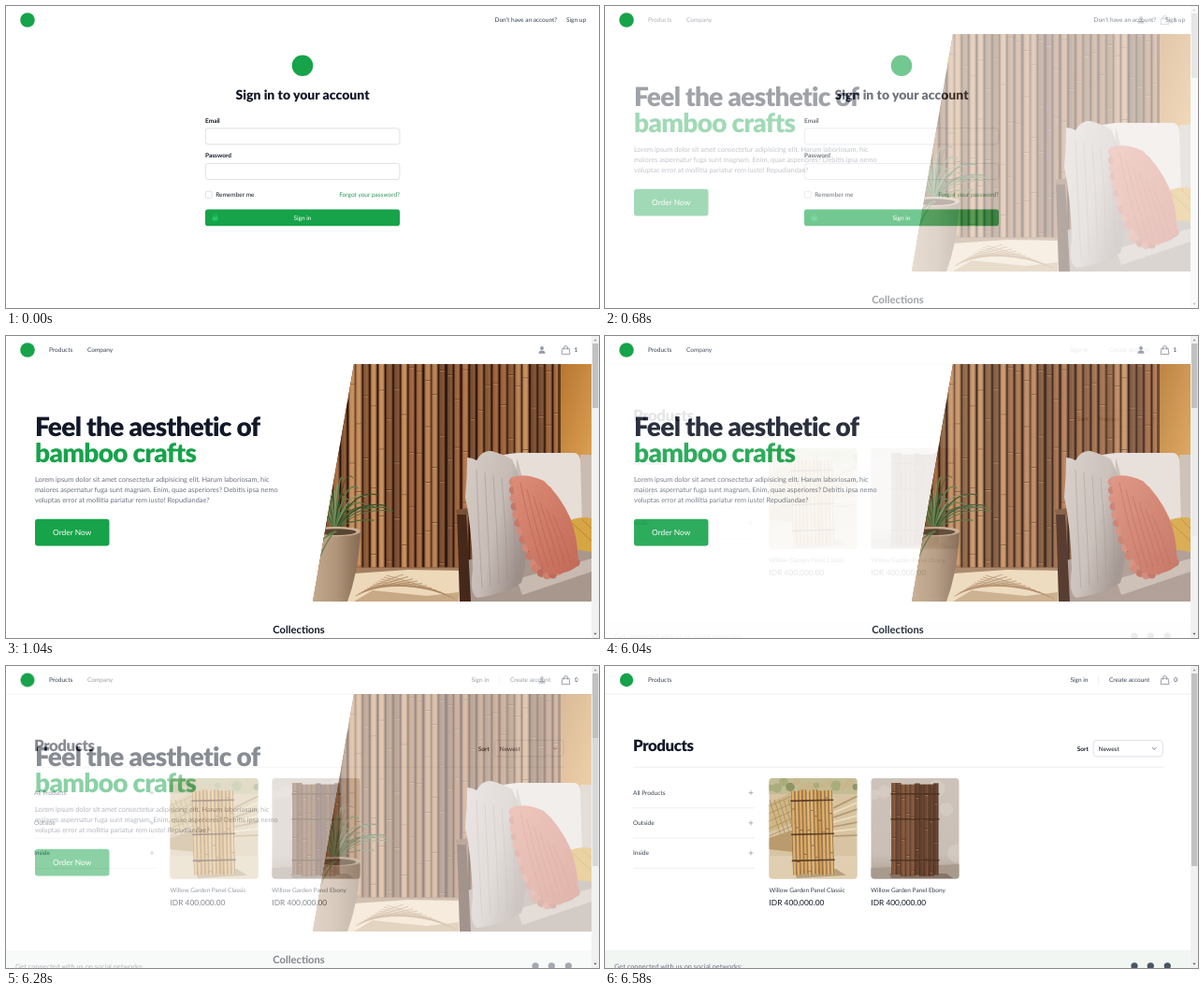
These frames come from a looping animation (634 by 323 pixels, 8000 ms). An HTML page:

```html
<!DOCTYPE html>
<html lang="en">
<head>
<meta charset="utf-8">
<title>Shop walkthrough</title>
<style>
html, body { margin: 0; width: 100%; height: 100%; overflow: hidden; background: #fff; }
svg { display: block; width: 100vw; height: 100vh; font-family: Lato, sans-serif; text-rendering: geometricPrecision; }
</style>
</head>
<body>
<svg id="stage" viewBox="0 0 634 323">
  <defs>
    <linearGradient id="pole">
      <stop offset="0" stop-color="#2a1006" stop-opacity=".55"/>
      <stop offset=".35" stop-color="#ffd9a8" stop-opacity=".14"/>
      <stop offset=".6" stop-color="#ffd9a8" stop-opacity=".22"/>
      <stop offset="1" stop-color="#2a1006" stop-opacity=".6"/>
    </linearGradient>
    <linearGradient id="linen" x2="1" y2=".6">
      <stop offset="0" stop-color="#d6ccc6"/><stop offset=".6" stop-color="#c6bbb5"/><stop offset="1" stop-color="#9c8e88"/>
    </linearGradient>
    <linearGradient id="clay">
      <stop offset="0" stop-color="#c3a98c"/><stop offset=".5" stop-color="#b0957a"/><stop offset="1" stop-color="#856a54"/>
    </linearGradient>
    <linearGradient id="rose" x2="1" y2="1">
      <stop offset="0" stop-color="#dc8d78"/><stop offset="1" stop-color="#c26a58"/>
    </linearGradient>
    <linearGradient id="plaster" x2="0" y2="1">
      <stop offset="0" stop-color="#cdc3ba"/><stop offset=".75" stop-color="#c9bfb6"/><stop offset="1" stop-color="#ad9f92"/>
    </linearGradient>
    <linearGradient id="wall" x2="1" y2="1">
      <stop offset="0" stop-color="#b5762f"/><stop offset="1" stop-color="#dda254"/>
    </linearGradient>
    <clipPath id="heroClip"><path d="M372 30H626V284H328Z"/></clipPath>
    <clipPath id="cardA"><rect x="175.5" y="120" width="94" height="107.5" rx="3.5"/></clipPath>
    <clipPath id="cardB"><rect x="284.5" y="120" width="94" height="107.5" rx="3.5"/></clipPath>
  </defs>
  <g id="login"></g>
  <g id="home" opacity="0"></g>
  <g id="list" opacity="0"></g>
</svg>
<script>
const GREEN = '#16a34a', INK = '#111827', BODY = '#374151', MUTED = '#6b7280', LINE = '#d1d5db', RULE = '#e5e7eb';
const SMALL = 6.53, BASE = 7.37;

let seed = 7;
const rand = () => (seed = (seed * 16807) % 2147483647) / 2147483647;
const pick = list => list[Math.floor(rand() * list.length)];
const times = (n, f) => Array.from({ length: n }, (_, i) => f(i)).join('');

const rect = (x, y, w, h, fill, more = '') => `<rect x="${x}" y="${y}" width="${w}" height="${h}" fill="${fill}" ${more}/>`;
const dot = (x, y, r, fill) => `<circle cx="${x}" cy="${y}" r="${r}" fill="${fill}"/>`;
const shape = (d, fill, more = '') => `<path d="${d}" fill="${fill}" ${more}/>`;
const stroke = (d, color, width = .8, more = '') => `<path d="${d}" fill="none" stroke="${color}" stroke-width="${width}" ${more}/>`;
const text = (x, y, str, size = SMALL, fill = BODY, weight = 400, more = '') =>
  `<text x="${x}" y="${y}" font-size="${size}" fill="${fill}" font-weight="${weight}" ${more}>${str}</text>`;
const title = (x, y, str, size, fill = INK) => text(x, y, str, size, fill, 900, 'letter-spacing="-.025em"');
const MID = 'text-anchor="middle"';
const page = () => rect(0, 0, 634, 323, '#fff');

const box = (x, y, w, h, r = 2.8) => rect(x, y, w, h, '#fff', `rx="${r}" stroke="${LINE}" stroke-width=".7"`);
const bag = () => stroke('M594.9 13.2H602.1L602.9 19.4H594.1ZM596.6 14.6V12.4A1.9 1.9 0 0 1 600.4 12.4V14.6', '#848b97', .8, 'stroke-linejoin="round"');

function scrollbar(end) {
  return rect(626, 0, 8, 323, '#f1f1f1') + rect(627, 8, 6.3, end - 8, '#c1c1c1') +
    shape('M628.5 5.2L630 3.2L631.5 5.2Z', '#8a8a8a') + shape('M628.5 317.8L630 319.8L631.5 317.8Z', '#505050');
}

function loginPage() {
  return page() + dot(23, 15, 7.8, GREEN) +
    text(522.5, 17.3, 'Don’t have an account?') + text(599, 17.3, 'Sign up') +
    dot(317, 63.8, 11.3, GREEN) +
    text(317, 100, 'Sign in to your account', 14, INK, 900, MID) +
    text(213, 124.6, 'Email', SMALL, INK, 700) + box(213.3, 130.8, 207.6, 17.2) +
    text(213, 162.3, 'Password', SMALL, INK, 700) + box(213.3, 168.4, 207.6, 17.2) +
    box(213.3, 198.3, 7, 7, 1.6) + text(224.2, 204.2, 'Remember me', SMALL, INK) +
    text(421, 204.2, 'Forgot your password?', SMALL, '#2b9557', 400, 'text-anchor="end"') +
    rect(213, 217.5, 208, 17.7, GREEN, 'rx="2.8"') +
    rect(220.6, 225.2, 6, 4.6, '#22c55e', 'rx=".8"') + stroke('M221.9 225.5V224.3A1.7 1.7 0 0 1 225.3 224.3V225.5', '#22c55e', .9) +
    text(317, 228.7, 'Sign in', SMALL, '#fff', 400, MID);
}

// Vertical cane with shaded sides and darker joints
function cane(x, y, w, h, color, gap) {
  let out = rect(x, y, w, h, color) + rect(x, y, w, h, 'url(#pole)');
  for (let j = y + rand() * gap; j < y + h; j += gap * (.7 + rand() * .6))
    out += rect(x + .6, j, w - 1.2, .9, '#3a1c0e', 'opacity=".55"') + rect(x + 1, j + .9, w - 2, .8, '#e6b983', 'opacity=".5"');
  return out;
}

// Spray of thin arching leaves
function spray(x, y, n) {
  return times(n, i => {
    const a = -2.5 + 2.2 * i / (n - 1), len = 26 + rand() * 44;
    const dx = Math.cos(a) * len, dy = Math.sin(a) * len;
    return stroke(`M${x} ${y}Q${x + dx * .4} ${y + dy * 1.05} ${x + dx} ${y + dy * .85}`, pick(['#4d6b3b', '#34502a', '#7f9767', '#5d7d48']), .8 + rand() * .7);
  });
}

function heroPhoto() {
  const browns = ['#a3623a', '#8a4e2a', '#bb8050', '#70401f', '#95582f', '#ac7145', '#5f331b'];
  return '<g clip-path="url(#heroClip)">' +
    rect(326, 30, 300, 254, '#2b130a') +
    times(32, i => cane(333 + i * 8.1 + rand(), 28, 6.4 + rand(), 220, pick(browns), 70)) +
    rect(592, 30, 34, 110, 'url(#wall)') + rect(590, 30, 3, 110, '#5c3519') +
    shape('M326 248H490V284H326Z', '#edd8ba') +
    shape('M370 247H490V251L430 250L372 254Z', '#8d6040', 'opacity=".75"') +
    times(12, i => stroke(`M${374 + i * 3} ${278 - i * 2}Q${402 + i * 6} ${262 + i} ${425 + i * 5} ${255 + i * 2.4}`, '#a67d58', 1.2, 'opacity=".6"')) +
    shape('M372 284L392 272L450 278L484 274V284Z', '#b18a63', 'opacity=".6"') +
    // sofa
    shape('M516 132Q540 123 560 125L608 125Q615 126 615 142L618 214H516Z', '#e6ded7') +
    shape('M546 130Q556 160 560 212H545Z', '#b5a9a0', 'opacity=".6"') +
    shape('M614 127H626V205H616Z', '#cabcb1') +
    shape('M490 240L626 222V284H490Z', '#a8978d') + shape('M546 260L626 238V252L552 277Z', '#c8bab0') +
    shape('M482 186H492L497 284H485Z', '#45281a') + shape('M481 186L494 184V191H482Z', '#7a5238') +
    shape('M600 198Q616 192 626 195V231L606 228Z', '#d6a544') + stroke('M605 200L626 219M616 196L626 206', '#b98729', 1) +
    shape('M493 130Q498 130 503 133Q509 122 519 123Q533 127 541 132Q550 150 553 172Q558 205 556 230Q555 252 551 264Q533 276 504 280Q495 276 499 250Q498 205 491 172Q493 152 493 130Z', 'url(#linen)') +
    times(5, i => stroke(`M${503 + i * 9} ${143 + i * 3}Q${505 + i * 10} 205 ${509 + i * 9} ${270 - i * 3}`, '#978a83', .9, 'opacity=".5"')) +
    // fringed pillow
    times(11, i => dot(542 + i * i * .22, 156 + i * 8.8, 4.4, i % 2 ? '#c97766' : '#d68877')) +
    times(8, i => dot(566 + i * 6.2, 249 + Math.sin(i * .7) * 7, 4.4, i % 2 ? '#bd6c5c' : '#ce7f6e')) +
    times(8, i => dot(580 + i * 4.2, 164 + i * 10.5, 3, '#cb7b69')) +
    shape('M541 151Q556 146 575 155Q592 170 603 194Q613 220 611 246Q596 258 576 253Q558 236 552 212Q545 190 541 151Z', 'url(#rose)') +
    times(6, i => stroke(`M${550 + i * 7} ${157 + i * 7}Q${558 + i * 8} ${200 + i * 4} ${574 + i * 6} ${249 - i}`, '#b15a49', .9, 'opacity=".55"')) +
    // planter
    spray(352, 208, 30) +
    shape('M328 209H379Q377 252 365 284H328Z', 'url(#clay)') +
    '<ellipse cx="353" cy="209" rx="26" ry="5.2" fill="#c9b195"/><ellipse cx="353" cy="209.6" rx="21.5" ry="3.4" fill="#594331"/>' +
    stroke('M352 209Q343 217 333 243M354 209Q342 214 332 222M353 208Q340 212 330 232', '#5f7a48', 1.1) +
    '</g>';
}

function homePage() {
  const lines = [
    'Lorem ipsum dolor sit amet consectetur adipisicing elit. Harum laboriosam, hic',
    'maiores aspernatur fuga sunt magnam. Enim, quae asperiores? Debitis ipsa nemo',
    'voluptas error at mollitia pariatur rem iusto! Repudiandae?'
  ];
  return page() + dot(23, 15, 7.8, GREEN) +
    text(46, 17.3, 'Products') + text(87, 17.3, 'Company') +
    dot(573, 13, 1.9, '#9199a5') + shape('M569.4 18.8Q569.8 15.6 573 15.6T576.6 18.8Z', '#9199a5') +
    bag() + text(607.4, 17.3, '1') +
    title(31, 106.7, 'Feel the aesthetic of', 28) + title(31, 134.7, 'bamboo crafts', 28, GREEN) +
    lines.map((s, i) => text(31, 155.6 + i * 11.2, s, BASE, MUTED)).join('') +
    rect(31, 195.8, 79.5, 28.7, GREEN, 'rx="3"') + text(70.7, 213.1, 'Order Now', 8.4, '#fff', 400, MID) +
    heroPhoto() +
    text(313, 317.5, 'Collections', 11.2, INK, 700, MID) +
    scrollbar(77);
}

function panel(x, y, n, w, h, colors, bands) {
  return times(n, i => cane(x + i * w, y + rand() * 2, w - .2, h, pick(colors), 45)) +
    bands.map(b => rect(x - 1, b, n * w + 2, 1.6, '#4a3220', 'opacity=".85"')).join('');
}

const lightPhoto = () => '<g clip-path="url(#cardA)">' +
  rect(175, 120, 95, 108, '#d8c4a2') + rect(175, 120, 95, 17, '#c3bd95') +
  times(14, i => dot(177 + i * 7, 123 + rand() * 8, 3 + rand() * 3, pick(['#a9ad7b', '#ddd9bd', '#c8b78c', '#8d9468']))) +
  shape('M175 147L200 135V168L175 178Z', '#cfb685') +
  times(6, i => stroke(`M175 ${150 + i * 8}L200 ${139 + i * 8}M${176 + i * 5} 143l12 38`, '#a98e60', .8)) +
  shape('M175 184L202 175V199L175 196Z', '#b99b6d') +
  times(7, i => stroke(`M244 ${152 + i * 5}L270 ${139 + i * 7}`, i % 2 ? '#eee0bf' : '#b2976b', 1.6)) +
  shape('M175 203H270V228H175Z', '#dfceb0') + shape('M202 219L247 217L258 224L205 227Z', '#a78d68', 'opacity=".7"') +
  '<g transform="rotate(-1.4 222 178)">' + panel(200, 132, 11, 4, 90, ['#d39f55', '#ddb06a', '#c69249', '#d8a862'], [143, 179, 207]) + '</g></g>';

const darkPhoto = () => '<g clip-path="url(#cardB)">' +
  rect(284, 120, 95, 108, 'url(#plaster)') +
  times(9, i => dot(288 + i * 11, 128 + rand() * 80, 5 + rand() * 6, 'rgba(226,219,211,.35)')) +
  shape('M284 216L379 212V228H284Z', '#a89a8c') + shape('M304 222H365L372 227H306Z', '#6f5d4f', 'opacity=".6"') +
  panel(306.5, 125, 10, 5, 98, ['#552b19', '#643520', '#422013', '#6b3d24'], [136, 163, 207]) + '</g>';

function listPage() {
  const filter = (name, i) => {
    const y = 135.6 + i * 32.2;
    return text(30, y + 2.3, name) + stroke(`M153.6 ${y}h4.8m-2.4 -2.4v4.8`, '#9ca3af', .8) +
      rect(30, y + 15.9, 130, .7, RULE);
  };
  const caption = (x, name) => text(x, 242, name) + text(x, 256, 'IDR 400,000.00', 8.4, INK);
  return page() + dot(23, 15, 7.2, GREEN) +
    text(46, 17.3, 'Products') + text(497.5, 17.3, 'Sign in') + rect(527.3, 10, .6, 10.5, RULE) +
    text(539, 17.3, 'Create account') + bag() + text(608.2, 17.3, '0') +
    rect(0, 29.7, 626, .7, RULE) +
    title(30, 91, 'Products', 16.8) +
    text(504.8, 90.6, 'Sort', SMALL, INK, 700) + box(522.2, 79.4, 74, 17.4) +
    text(527.8, 90.6, 'Newest', SMALL, INK) + stroke('M585.2 87.2L587.3 89.3L589.4 87.2', MUTED, .9) +
    rect(30, 107.8, 567, .7, RULE) +
    ['All Products', 'Outside', 'Inside'].map(filter).join('') +
    lightPhoto() + darkPhoto() +
    caption(175.5, 'Willow Garden Panel Classic') + caption(284.3, 'Willow Garden Panel Ebony') +
    rect(0, 304, 626, 19, '#f1f6f3') +
    text(10, 323.6, 'Get connected with us on social networks:', BASE, MUTED) +
    [566, 583.3, 601.3].map(x => dot(x, 320.8, 3.6, '#4b5563')).join('') +
    scrollbar(214);
}

const $ = id => document.getElementById(id);
$('login').innerHTML = loginPage();
$('home').innerHTML = homePage();
$('list').innerHTML = listPage();

// Dissolve in ten steps of 60 ms
const dissolve = (t, start) => Math.min(10, Math.max(0, Math.floor((t - start) / 60) + 1)) / 10;

function draw(t) {
  $('home').setAttribute('opacity', dissolve(t, 500));
  $('list').setAttribute('opacity', dissolve(t, 6040));
}

function tick() {
  draw(performance.now() % 8000);
  requestAnimationFrame(tick);
}
tick();
</script>
</body>
</html>
```
